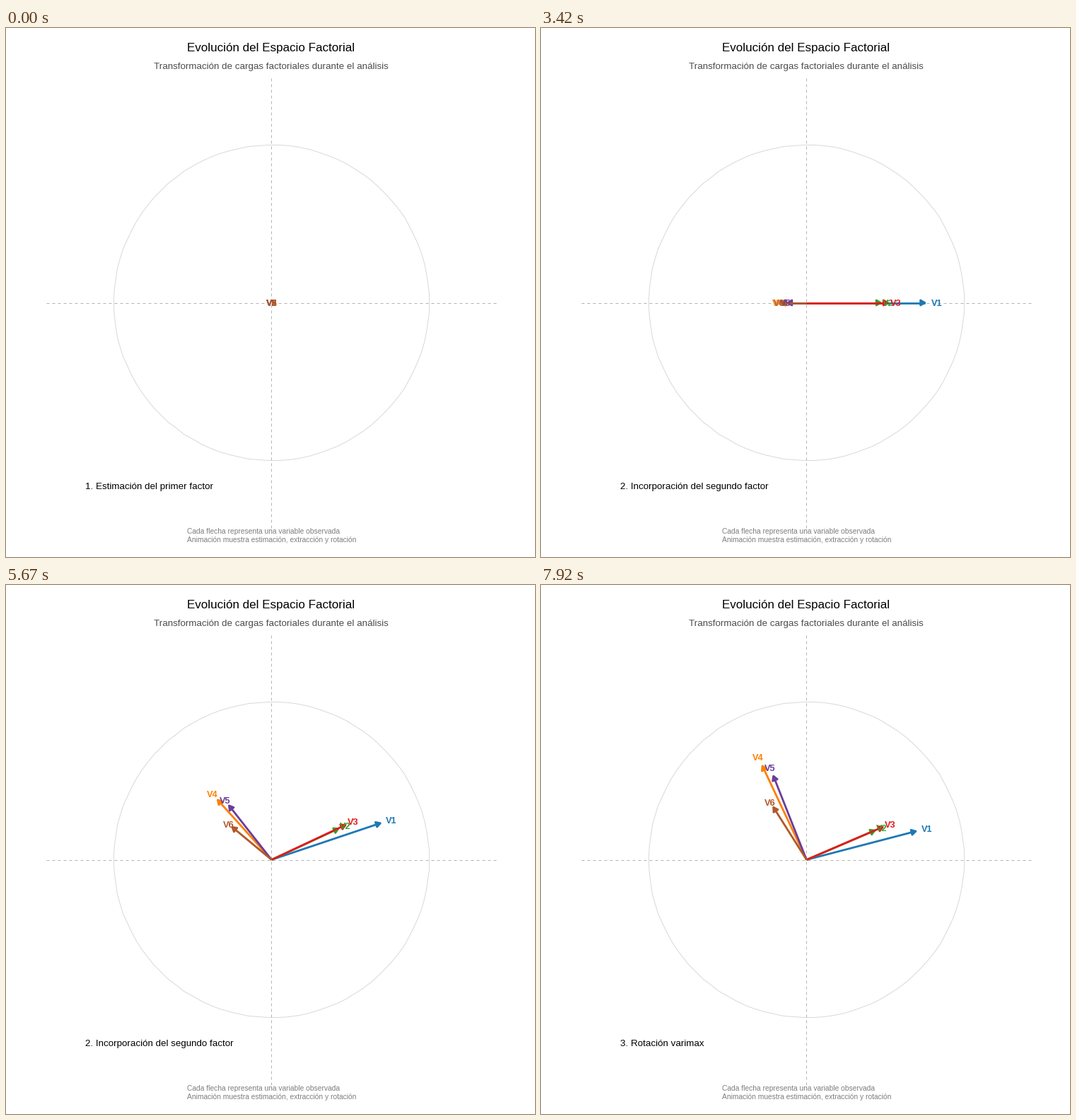
Animation, 748 px wide and 748 px high, one loop 8 s. Source, as a matplotlib script:

```python
import numpy as np
import matplotlib.pyplot as plt
from matplotlib.animation import FuncAnimation
from matplotlib.patches import Polygon

SIZE, DPI = 748, 88
FRAMES, LOOP_MS = 96, 8000
CX, CY, R = 375.5, 388.5, 223
PT = 72 / DPI  # points per pixel

STAGES = ["1. Estimación del primer factor",
          "2. Incorporación del segundo factor",
          "3. Rotación varimax"]

# colour, then loadings after estimation, extraction and rotation
VARIABLES = {
    "V1": ("#1F78B4", (0.75, 0), (0.663, 0.335), (0.745, -0.095)),
    "V2": ("#33A02C", (0.47, 0), (0.402, 0.284), (0.486, 0.01)),
    "V3": ("#E31A1C", (0.515, 0), (0.447, 0.318), (0.547, 0.01)),
    "V4": ("#FF7F00", (-0.165, 0), (-0.42, 0.548), (-0.03, 0.678)),
    "V5": ("#6A3D9A", (-0.12, 0), (-0.336, 0.496), (0.015, 0.592)),
    "V6": ("#B15928", (-0.16, 0), (-0.289, 0.299), (-0.069, 0.393)),
}
HEAD, HEAD_ANGLE = 7.1, np.radians(30)

plt.rcParams["font.family"] = "Liberation Sans"
fig = plt.figure(figsize=(SIZE / DPI, SIZE / DPI), dpi=DPI, facecolor="white")
ax = fig.add_axes([0, 0, 1, 1])
ax.set_xlim(0, SIZE)
ax.set_ylim(SIZE, 0)
ax.axis("off")


def write(x, y, text, px, color="black", **kw):
    return ax.text(x, y, text, fontsize=px * PT, color=color,
                   va="baseline", **kw)


def dashed(xs, ys):
    ax.plot(xs, ys, color="#B3B3B3", lw=PT, dashes=(4, 4),
            dash_capstyle="butt", zorder=1)


class Arrow:
    def __init__(self, name, color, *loads, order):
        self.keys = np.array([(0, 0), *loads], float)
        self.shaft, = ax.plot([], [], color=color, lw=2.8 * PT, zorder=order,
                              solid_capstyle="butt")
        self.head = Polygon(np.zeros((3, 2)), closed=True, fc=color, ec=color,
                            lw=2.8 * PT, joinstyle="round", zorder=order)
        ax.add_patch(self.head)
        self.label = write(CX, CY, name, 12.8, color, weight="bold",
                           ha="center", zorder=20 + order)

    def move(self, stage, t):
        load = (1 - t) * self.keys[stage] + t * self.keys[stage + 1]
        dx, dy = R * load * (1, -1)
        tip = np.array([CX + dx, CY + dy])
        self.shaft.set_data([CX, tip[0]], [CY, tip[1]])
        back = np.arctan2(-dy, -dx)
        sides = [tip + HEAD * np.array([np.cos(a), np.sin(a)])
                 for a in (back - HEAD_ANGLE, back + HEAD_ANGLE)]
        self.head.set_xy([sides[0], tip, sides[1]])
        visible = bool(np.hypot(dx, dy) > 0)
        self.shaft.set_visible(visible)
        self.head.set_visible(visible)
        self.label.set_position((CX + 1.1 * dx, CY + 1.1 * dy + 4.9))


angle = np.linspace(0, 2 * np.pi, 100)
ax.plot(np.round(CX - 0.5 + R * np.cos(angle)) + 0.5,
        np.round(CY - 0.5 - R * np.sin(angle)) + 0.5,
        color="#D9D9D9", lw=PT, zorder=0)
dashed([57, 694], [CY, CY])
dashed([CX, CX], [707, 69])

write(375, 33, "Evolución del Espacio Factorial", 17, ha="center")
write(375, 58, "Transformación de cargas factoriales durante el análisis",
      13.35, "#4D4D4D", ha="center")
write(255.7, 715, "Cada flecha representa una variable observada",
      10.25, "#7F7F7F")
write(255.7, 727, "Animación muestra estimación, extracción y rotación",
      10.25, "#7F7F7F")
caption = write(112, 652, STAGES[0], 13.4)

arrows = [Arrow(name, *spec, order=5 + i)
          for i, (name, spec) in enumerate(VARIABLES.items())]


def phase(n):
    """Stage index and progress within it."""
    if n <= 40:
        return 0, n / 40
    if n <= 80:
        return 1, (n - 41) / 39
    return 2, (n - 81) / 39


def update(n):
    stage, t = phase(n)
    caption.set_text(STAGES[stage])
    for arrow in arrows:
        arrow.move(stage, t)
    return []


anim = FuncAnimation(fig, update, frames=FRAMES, interval=LOOP_MS / FRAMES,
                     init_func=lambda: update(0), repeat=True, repeat_delay=0,
                     blit=False)
plt.show()
```
